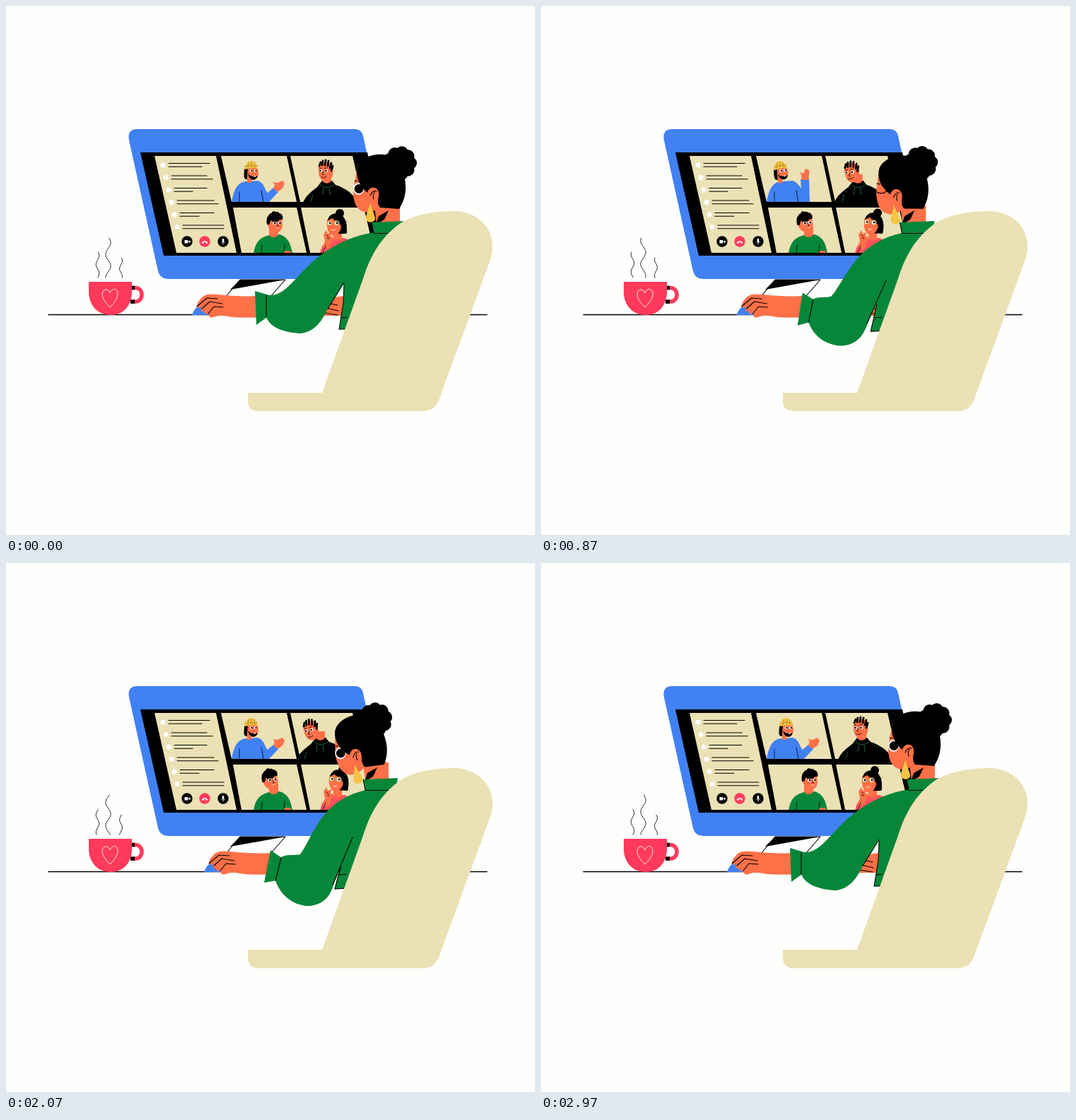
Animation of 748x748 px, one loop 3 s. Source, as an HTML page:

```html
<!DOCTYPE html>
<html lang="en">
<head>
<meta charset="utf-8">
<title>Video call</title>
<style>
html, body { margin: 0; width: 100%; height: 100%; overflow: hidden; background: #fefefc; }
svg { display: block; width: 100%; height: 100%; }
.line { fill: none; stroke: #000; stroke-width: 1.1; stroke-linecap: round; stroke-linejoin: round; }
.thin { fill: none; stroke: #000; stroke-width: .8; stroke-linecap: round; }
.beige { fill: #ebe1b5; }
.blue { fill: #4181f3; }
.green { fill: #068639; }
.skin { fill: #fd7048; }
.red { fill: #ff3a5c; }
.coral { fill: #ff525c; }
.gold { fill: #f5c443; }
.white { fill: #fff; }
</style>
</head>
<body>
<svg id="stage" viewBox="0 0 748 748"></svg>
<script>
const stage = document.getElementById('stage');
const LOOP = 3000;

const tiles = [
  'M304 212H397L411 277H319Z',
  'M402 212H490L505 277H416Z',
  'M321 285H411L425 349H333Z',
  'M417 285H506L521 349H430Z'
];

const path = (cls, d, id = '') => `<path ${id && `id="${id}"`} class="${cls}" d="${d}"/>`;
const dot = (cls, x, y, r) => `<circle class="${cls}" cx="${x}" cy="${y}" r="${r}"/>`;

// An eye with an open state and a closed lid
const eye = (x, y, rx, ry, pupil, look) => `<g transform="translate(${x} ${y})">
  <g class="open"><ellipse class="white" rx="${rx}" ry="${ry}"/><circle cx="${look}" r="${pupil}"/></g>
  <path class="lid line" d="M${-rx} 0q${rx} ${rx * .7} ${rx * 2} 0"/></g>`;

const scallops = (x, y, ring, r, n) => Array.from({ length: n }, (_, i) => {
  const a = i / n * Math.PI * 2;
  return dot('', x + ring * Math.cos(a), y + ring * Math.sin(a), r);
}).join('') + dot('', x, y, ring);

function sidebar() {
  const rows = [[58, 47], [50, 58], [46, 26], [52, 58], [48, 27], [58, 58]];
  return path('beige', 'M210 212H297L326 349H241Z') + rows.map(([a, b], i) => {
    const x = 222 + i * 4, y = 225 + i * 17.5;
    return dot('white', x, y, 3.5) + path('line', `M${x + 8} ${y - 2.5}h${a}M${x + 8} ${y + 2.3}h${b}`);
  }).join('') +
  dot('', 256, 333, 7.7) + dot('red', 281, 333, 7.7) + dot('', 307, 333, 7.7) +
  path('white', 'M252.500 331h4.800v4.500h-4.800zM258 332.800l2.500-1.500v4l-2.500-1.500z') +
  path('white', 'M276.500 334.500q4.500-5 9 0l-1.500 1.500-2-1v-1.500h-2v1.500l-2 1z') +
  '<rect class="white" x="305.700" y="329" width="2.600" height="5" rx="1.300"/>' +
  '<path d="M304.500 333q2.500 4.500 5 0M307 335.500v2" fill="none" stroke="#fff" stroke-width=".8"/>';
}

const beanieMan = () =>
  path('blue', '', 'talkArm') + path('skin', '', 'talkHand') +
  path('blue', 'M319 277C322 260 327 249 340 248L356 247C365 250 368 260 370 277Z') +
  path('thin', 'M330 263V277M361 261L364 277') +
  `<g id="head1">
    ${path('', 'M337 229C337 238 335 243 339 245L348 245 347 229Z')}
    ${path('skin', 'M342 229H356L357 237 355 243C352 246 349 246 347 245L347 250H341V240Z')}
    ${path('', 'M342 237C345 241 350 242 356 240L354 244C349 248 344 245 342 237Z')}
    ${path('white', 'M349 240.500h5l-2 1.500z')}
    ${path('gold', 'M337 231C338 224 341 220 346 219C352 219 355 223 356 230C350 229 344 230 337 231Z')}
    <path d="M338 227q9-3 18-.5M343 221l-1 8M347 220v9M351 221l1 8" fill="none" stroke="#a8761d" stroke-width=".7"/>
    ${eye(347, 233, 2.2, 2, 1.2, .6)}${eye(353, 233, 2.2, 2, 1.2, .6)}
  </g>`;

const hoodieMan = () => `<g id="body2">
    ${path('', 'M420 278C424 268 432 262 440 256L447 247H461L466 253C479 257 492 266 498 278Z')}
    ${path('skin', 'M447 238H460V247C457 252 450 252 447 247Z')}
    <path d="M444 252q8 9 20 1M449 257l-1 10M457 257l1 10M434 267l-3 10" fill="none" stroke="#1d6d4f" stroke-width=".9"/>
  </g><g id="head2">
    ${path('skin', 'M442 228C443 222 449 219 456 221C462 224 463 231 462 239C460 246 454 249 449 247C443 245 441 237 442 228Z')}
    <path d="M443 226l2-5M447 225l1-6M451 225l1-7M455 226l1-7M458 229l2-7M460 233l2-7" stroke="#000" stroke-width="2.800" stroke-linecap="round"/>
    ${eye(445, 233, 2.3, 2, 1.3, -.5)}${eye(453, 233, 2.4, 2.1, 1.3, -.5)}
    ${path('thin', 'M443 229l3 .5M450 229.500l4-1M449 234l-2 4 2 .5M446 242q4 2 7-1')}
  </g>`;

const greenMan = () =>
  path('green', 'M350 350C352 336 358 328 369 325L374 323H387C398 326 403 336 405 350Z') +
  path('skin', 'M372 312H385V324C381 328 375 328 372 324Z') +
  path('thin', 'M362 338L361 349M394 337L393 349') +
  '<ellipse class="skin" cx="398" cy="348" rx="5" ry="2"/>' +
  `<g id="head3">
    ${path('skin', 'M370 302C373 296 386 295 390 301L391 309C391 317 386 321 380 320C373 319 369 312 370 302Z')}
    ${path('', 'M369 309C367 298 371 293 381 292C389 292 393 296 391 302C384 303 379 301 375 302L372 309Z')}
    ${scallops(380, 298, 5, 3, 7)}
    ${eye(379.5, 307, 2.5, 2.2, 1.4, .5)}${eye(387, 307, 2.4, 2.2, 1.4, .5)}
    ${path('white', 'M380 313q4 2 7-.5q-2 4-7 .5')}
    ${path('thin', 'M377 303.500l4-.5M384 308l1.500 3-2 .5')}
  </g>`;

const glassesWoman = () =>
  path('', 'M468 300L481 304 482 321H468Z') +
  path('coral', 'M444 350C446 338 452 331 460 329L478 328C488 331 494 339 497 350Z') +
  path('skin', 'M463 316H475V329C470 333 465 332 463 328Z') +
  `<g id="head4">
    ${dot('', 472, 293, 6)}
    ${path('', 'M455 303C456 294 467 290 475 296C481 301 483 311 481 322H469Z')}
    ${path('skin', 'M454 304C458 299 466 298 472 304L474 313C472 321 467 326 461 324C455 321 453 313 454 304Z')}
    ${path('', 'M454 304C457 296 468 293 477 303L476 311C470 308 464 302 461 300Z')}
    ${path('white', 'M459 316q4 2 8-1q-4 5-8 1')}
    ${eye(457.5, 307, 2.6, 2.6, 1.4, .5)}${eye(467.5, 307, 2.9, 2.8, 1.4, .5)}
    <path d="M454 307a3.700 3.700 0 1 0 7.400 0a3.700 3.700 0 1 0-7.400 0M463.500 307a4 4 0 1 0 8 0a4 4 0 1 0-8 0M461.500 306h2" fill="none" stroke="#c99a2a" stroke-width=".8"/>
  </g>` +
  path('skin', 'M451 333L449 323 453 317 455 322 460 320 459 326 463 326 460 335 456 344 447 341Z') +
  path('thin', 'M453 324l3 2M454 328l3 1M452 339l-4 10');

const people = [beanieMan, hoodieMan, greenMan, glassesWoman];

const heart = 'M147 426C140 419 136 413 136 407C137 399 145 399 147 406C150 398 158 399 158 407C158 413 154 419 147 426Z';

stage.innerHTML = `
  <defs>${tiles.map((d, i) => `<clipPath id="clip${i}"><path d="${d}"/></clipPath>`).join('')}</defs>
  <path class="line" d="M60 436.500H680" style="stroke-width:1.400"/>
  <path class="line" d="M331 387H395L352 436H290Z" style="fill:#fefefc"/>
  <path d="M331 387H395L317 401Z"/>
  ${path('blue', 'M186 174H493Q503 174 505 184L547 374Q549 386 537 386H229Q218 386 215 375L174 190Q171 174 186 174Z')}
  <path d="M190 207H511L543 353H223Z"/>
  ${sidebar()}
  ${tiles.map((d, i) => path('beige', d) + `<g class="person" clip-path="url(#clip${i})">${people[i]()}</g>`).join('')}

  <path d="M177 398.500H183.500A8.500 9.700 0 0 1 183.500 418H177" fill="none" stroke="#ff3a5c" stroke-width="5.500"/>
  <path d="M176 398.500h6M176 418h6" stroke="#000" stroke-width="5.500"/>
  ${path('red', 'M117 390H178V406C177 425 165 437 148 437S118 425 117 406Z')}
  <path d="${heart}" fill="none" stroke="#fff" stroke-width=".9"/>
  ${[0, 1, 2].map(i => path('thin', '', 'steam' + i)).join('')}

  <g id="farHand">
    ${path('skin', 'M446 438C446 425 452 414 462 412L478 410V438Z')}
    ${path('line', 'M455 420l14 3M453 427l17 4M451 434l18 3')}
  </g>
  <g id="hand">
    ${path('blue', 'M263 437C266 428 272 422 280 422L292 437Z')}
    ${path('skin', 'M358 410C338 411 318 410 300 408C290 407 283 407 278 411C273 416 269 422 270 425C272 428 275 427 277 425C274 430 276 434 280 431C280 436 283 437 287 434C285 440 290 442 296 439C305 436 313 439 322 440C335 441 346 440 358 441Z')}
    ${path('line', 'M270 425L284 413 299 414M277 428L288 418 306 421M286 435L294 425 307 426')}
  </g>
  <g id="neck">
    ${path('skin', 'M520 276L557 282V308H524Z')}
    ${path('', 'M523 309L527 297 541 289 535 302Z')}
  </g>
  ${path('green', '', 'sweater')}
  ${path('green', '', 'cuff')}
  ${path('line', '', 'folds')}
  <g id="collar">
    ${path('green', 'M517 306L566 304 563 322 520 322Z')}
    ${path('line', 'M520 321.500H552M517 306L520 321')}
  </g>
  <g id="head">
    ${path('skin', 'M498 224L494 243 491 260C491 276 494 285 503 290C511 294 520 291 528 285L530 245Z')}
    ${eye(498.5, 258.5, 7.5, 8.5, 6.4, .5)}
    ${path('', 'M497 243C494 229 499 220 508 215C517 210 531 208 543 212C558 218 566 238 565 260C564 274 559 281 556 287L529 285C525 281 526 274 526 266C525 255 515 253 511 264C504 258 499 251 497 243Z')}
    ${scallops(557, 222, 15, 9, 9)}
    ${path('skin', 'M510 268C511 255 525 253 527 264C528 274 523 282 516 283C511 283 508 277 510 268Z')}
    ${path('line', 'M515 268Q519 260 524 262M521 264Q518 268 520 273M493 247l4 1')}
    ${path('gold', 'M515 278C513 288 508 296 509 302C512 307 519 307 522 302C522 295 517 288 515 278Z')}
  </g>
  ${path('beige', 'M342 547H447L504 388C516 350 532 325 558 307C577 295 605 290 637 290C668 292 688 314 688 340Q688 350 684 361L615 549C610 566 603 573 587 573H358Q342 573 342 558Z')}
`;

const $ = id => document.getElementById(id);
const setPath = (id, d) => $(id).setAttribute('d', d);
const place = (id, x, y, turn = 0, cx = 0, cy = 0) =>
  $(id).setAttribute('transform', `translate(${x} ${y}) rotate(${turn} ${cx} ${cy})`);

// Eased value of a track of [time, value] pairs
function at(track, t) {
  const i = track.findIndex(k => k[0] > t);
  if (i < 0) return track[track.length - 1][1];
  if (i === 0) return track[0][1];
  const [t0, a] = track[i - 1], [t1, b] = track[i];
  const u = (t - t0) / (t1 - t0);
  return a + (b - a) * u * u * (3 - 2 * u);
}

// Blend two paths that share the same commands
function blend(a, b, p) {
  const to = b.match(/-?[\d.]+/g);
  let i = 0;
  return a.replace(/-?[\d.]+/g, n => (+n + (to[i++] - n) * p).toFixed(2));
}

const shapes = {
  sweater: [
    'M520 320C492 325 466 336 444 353C420 371 404 396 388 405C380 410 372 409 367 408L368 440C374 455 392 461 415 463C434 462 446 448 455 428L478 391L477 420L471 457L500 457L570 321Z',
    'M509 321C486 326 464 338 450 356C434 376 426 398 416 412C408 414 398 411 389 416L381 449C388 470 406 484 427 485C446 484 458 474 463 455L474 428L470 441L465 461L500 460L552 321Z'
  ],
  cuff: ['M352 403L369 408L369 440L354 451Z', 'M374 406L390 417L382 449L365 452Z'],
  folds: [
    'M478 391L455 428M478 393L477 420L471 457L481 457M368 409L368 440M474 441L482 440',
    'M490 388L462 455M474 430L470 441L465 461L478 460M389 417L381 449M470 441L482 440'
  ]
};
const talk = {
  talkArm: [
    'M356 249C364 252 367 261 370 264L378 257L385 263L372 277L352 277Z',
    'M356 249C362 251 366 254 368 258L367 245L379 244L380 277L354 277Z'
  ],
  talkHand: [
    'M378 258L380 252L377 249L384 250L391 247L394 251L391 258L384 263Z',
    'M369 246L368 239L366 235L371 237L374 230L379 232L379 239L378 246Z'
  ]
};

const reach = [[0, 0], [550, 0], [1000, 1], [2330, 1], [2770, 0]];
const nod = [[0, 0], [550, 0], [900, -4], [1630, -5], [2000, -12], [2330, -12], [2770, 0]];
const gesture = [[0, 0], [520, 0], [800, 1], [1050, 1], [1400, 0]];
const lean2 = [[0, 0], [120, 0], [430, -8], [870, -12], [1640, -12], [2000, -20], [2400, -20], [2800, 0]];
const lean3 = [[0, 0], [150, 0], [430, -5], [800, -8], [2100, -8], [2370, 0]];
const lean4 = [[0, 0], [550, 0], [900, 1], [2100, 1], [2400, 0]];

const blinks = [[430, 2400], [1250], [430, 1300], [1200, 2640]];
const mainBlinks = [870, 1680, 2400];

function setEyes(root, times, t) {
  const gap = Math.min(...times.map(b => Math.abs(t - b)));
  const open = Math.min(1, Math.max(.05, (gap - 25) / 85));
  root.querySelectorAll('.open').forEach(e => {
    e.setAttribute('transform', `scale(1 ${open})`);
    e.setAttribute('visibility', open < .2 ? 'hidden' : 'visible');
  });
  root.querySelectorAll('.lid').forEach(e => e.setAttribute('visibility', open < .2 ? 'visible' : 'hidden'));
}

function steam(id, x, top, length, amp, t) {
  let d = '';
  for (let y = 384; y >= top; y -= 2) {
    const a = 2 * Math.PI * ((y - top - length * .2) / length + t / 1500);
    d += (d ? 'L' : 'M') + (x + amp * Math.cos(a)).toFixed(2) + ' ' + y;
  }
  setPath(id, d);
}

const faces = [...document.querySelectorAll('.person')];

function draw(t) {
  const p = at(reach, t);
  for (const id in shapes) setPath(id, blend(...shapes[id], p));
  place('hand', 17 * p, 0);
  place('farHand', 16 * p, 0);
  place('neck', -16 * p, 0);
  place('collar', -12 * p, 0);
  place('head', -18 * p, p, at(nod, t), 540, 300);
  setEyes($('head'), mainBlinks, t);

  const g = at(gesture, t);
  for (const id in talk) setPath(id, blend(...talk[id], g));
  place('head1', -6 * g, 0, -8 * g, 346, 246);

  const a = at(lean2, t);
  place('body2', a * .45, 0);
  place('head2', a * .9, -a * .12, a * .6, 454, 246);

  const b = at(lean3, t);
  place('head3', b * .6, 0, b * .9, 379, 322);

  const c = at(lean4, t);
  place('head4', 2 * c, -c, 4 * c, 467, 323);

  faces.forEach((f, i) => setEyes(f, blinks[i], t));

  steam('steam0', 129.5, 348, 25, 2.3, t);
  steam('steam1', 144.5, 328, 33, 3.6, t);
  steam('steam2', 162.5, 356, 22, 2, t);
}

const start = performance.now();
function frame() {
  draw((performance.now() - start) % LOOP);
  requestAnimationFrame(frame);
}
frame();
</script>
</body>
</html>
```
